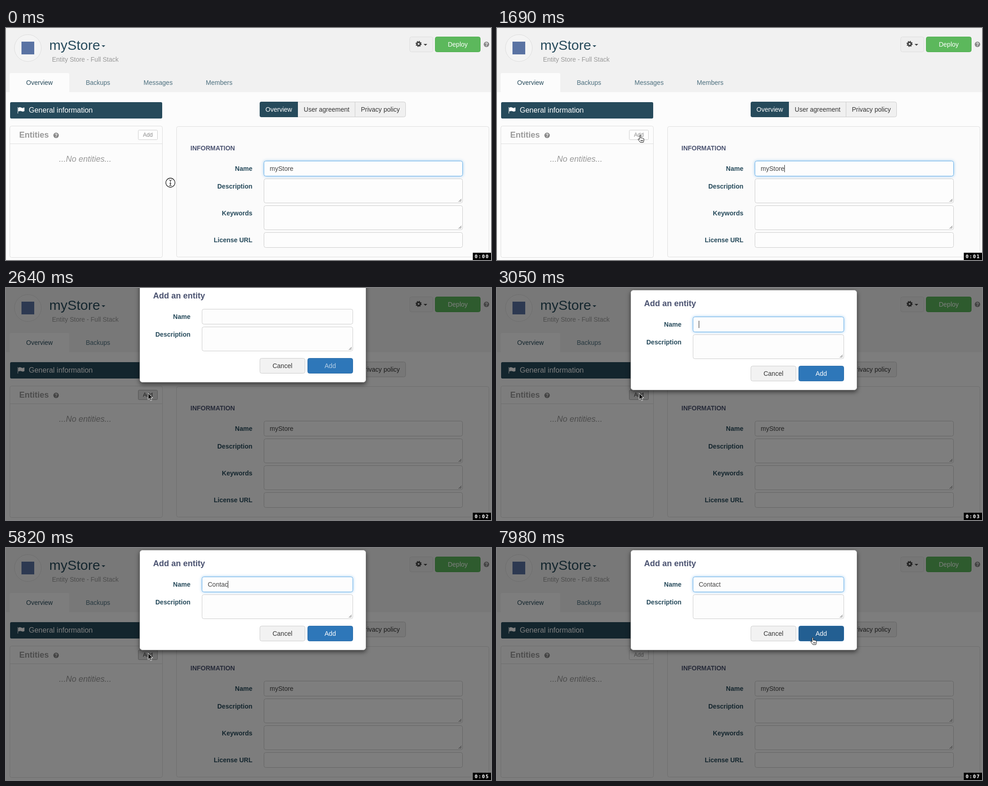
An HTML page that plays this animation: 1065 px wide and 510 px high, repeating every 8 s.

```html
<!DOCTYPE html>
<html lang="en">
<head>
<meta charset="utf-8">
<title>Add an entity</title>
<style>
html, body { margin: 0; width: 100%; height: 100%; overflow: hidden; background: #fcfcfc; }
svg { display: block; }
text { font: 14px "Liberation Sans", Arial, sans-serif; white-space: pre; }
.focus { stroke: #66afe9; filter: drop-shadow(0 0 3px rgba(102, 175, 233, .7)); }
.modal { filter: drop-shadow(0 4px 5px rgba(0, 0, 0, .5)); }
.bubble { filter: drop-shadow(0 2px 3px rgba(0, 0, 0, .3)); }
#clock { font: bold 11px "DejaVu Sans Mono", monospace; letter-spacing: 1.4px; }
</style>
</head>
<body>
<svg id="stage" width="1065" height="510" viewBox="0 0 1065 510"></svg>
<script>
const TEAL = '#264a5b', LINK = '#4c6f7e', GREY = '#999';

const text = (x, y, s, fill = '#333', attrs = '', style = '') =>
  `<text x="${x}" y="${y}" fill="${fill}" ${attrs} style="${style}">${s}</text>`;
const centered = (x, y, s, fill, style) => text(x, y, s, fill, 'text-anchor="middle"', style);
const label = (x, y, s) => text(x, y, s, TEAL, 'text-anchor="end"', 'font-weight:bold');
const box = (x, y, w, h, fill, stroke = 'none', r = 4, attrs = '') =>
  `<rect x="${x + .5}" y="${y + .5}" width="${w - 1}" height="${h - 1}" rx="${r}" fill="${fill}" stroke="${stroke}" ${attrs}/>`;
const input = (x, y, w, h = 34, attrs = '') => box(x, y, w, h, '#fdfdfd', '#ccc', 4, attrs);
const area = (x, y, w) => input(x, y, w, 54) +
  `<path d="M${x + w - 9} ${y + 51}l6-6m-3 6l3-3" stroke="#555" fill="none"/>`;
const help = (x, y) => `<circle cx="${x}" cy="${y}" r="6" fill="#888"/>` +
  centered(x, y + 3.5, '?', '#fff', 'font-size:10px;font-weight:bold');
const down = (x, y, fill) => `<path d="M${x} ${y}h8l-4 4z" fill="${fill}"/>`;
const bar = (id, x, y) => `<rect id="${id}" x="${x}" y="${y}" width="1" height="16" fill="#222"/>`;

const header = box(0, 0, 1065, 141, '#f1f1f1', '#f1f1f1', 0) +
  '<circle cx="48" cy="44" r="29.5" fill="#f4f4f4" stroke="#ddd"/>' +
  '<rect x="34" y="30" width="28" height="28" fill="#5a73a3"/>' +
  text(95, 48, 'myStore', TEAL, '', 'font-size:30px') + down(210, 38, TEAL) +
  text(101, 74, 'Entity Store - Full Stack', GREY) +
  box(886, 19, 52, 34, '#eee', '#ddd') +
  '<circle cx="906" cy="35" r="3.7" fill="none" stroke="#444" stroke-width="3.2"/>' +
  '<circle cx="906" cy="35" r="5.6" fill="none" stroke="#444" stroke-width="2.2" stroke-dasharray="2.2 2.2"/>' +
  down(917, 35, '#444') +
  box(942, 19, 100, 34, '#5cb85c', '#4cae4c') + centered(992, 41, 'Deploy', '#fff') + help(1055, 36) +
  box(8, 99, 131, 43, '#fcfcfc', '#fcfcfc', 2) +
  centered(73.5, 125, 'Overview', TEAL) + centered(202, 125, 'Backups', LINK) +
  centered(334, 125, 'Messages', LINK) + centered(468, 125, 'Members', LINK);

const sidebar = box(9, 163, 334, 36, TEAL, TEAL, 2) +
  '<path d="M26 174v14M27.500 175.500q3-2 6 0t6.500-.5v7.500q-3 1.500-6 0t-6.500.5z" fill="#fff" stroke="#fff"/>' +
  text(50, 186, 'General information', '#fff', '', 'font-size:16px') +
  box(8, 215, 336, 290, '#fcfcfc', '#ddd') + '<path d="M9 254.500h334" stroke="#ddd"/>' +
  text(29, 241, 'Entities', GREY, '', 'font-size:18px;font-weight:bold') + help(110, 236) +
  box(290, 224, 43, 22, '#fff', '#ccc', 2, 'id="addBox"') +
  centered(311.5, 239, 'Add', '#888', 'font-size:12px').replace('<text', '<text id="addText"') +
  centered(174, 294, '...No entities...', GREY, 'font-size:18px;font-style:italic');

const form = box(557, 162, 321, 34, '#f0f0f0', '#ccc') +
  `<path d="M641 162h-80q-4 0-4 4v26q0 4 4 4h80z" fill="${TEAL}"/><path d="M766.500 163v32" stroke="#ccc"/>` +
  centered(599, 184, 'Overview', '#fff') + centered(704, 184, 'User agreement') +
  centered(822, 184, 'Privacy policy') +
  box(374, 216, 687, 288, '#fbfbfb', '#ddd') +
  text(405, 269, 'INFORMATION', '#4a5270', '', 'font-weight:bold') +
  label(541, 314, 'Name') + input(566, 292, 437, 34, 'id="storeName"') + text(579, 314, 'myStore', '#444') +
  bar('storeCaret', 631, 301) +
  label(541, 353, 'Description') + area(566, 331, 437) +
  label(541, 412, 'Keywords') + area(566, 390, 437) +
  label(541, 471, 'License URL') + input(566, 449, 437);

const tooltip = '<g id="tooltip"><path class="bubble" fill="#fff" stroke="#ccc" ' +
  'd="M270 173.500h82q6 0 6 6v27q0 6-6 6h-31l-9.500 9.500-9.500-9.500h-32q-6 0-6-6v-27q0-6 6-6z"/>' +
  centered(311, 198, 'Add entity', '#a2a2a2') + '</g>';

const dialog = '<g id="dialog"><rect id="backdrop" width="1065" height="510" fill="#000" opacity=".5"/><g id="modal">' +
  box(293, 4, 498, 221, '#fff', '#777', 6, 'class="modal"') +
  text(323, 40, 'Add an entity', '#4a5270', '', 'font-size:18px;font-weight:bold') +
  label(405, 85, 'Name') + input(430, 63, 332, 34, 'id="entityName"') +
  text(443, 85, '', '#444', 'id="typed"') + bar('entityCaret', 443, 72) +
  label(405, 124, 'Description') + area(430, 102, 332) +
  box(557, 171, 100, 34, '#f2f2f2', '#ccc') + centered(607, 193, 'Cancel') +
  box(662, 171, 100, 34, '#2e77b9', '#2a6ba6', 4, 'id="confirm"') +
  centered(712, 193, 'Add', '#fff').replace('<text', '<text id="confirmText"') + '</g></g>';

// The pointer shapes have their hot spot at 0,0.
const pointer = '<g id="pointer">' +
  '<circle id="click" r="10" fill="#fff" stroke="#222" stroke-width="1.3"/>' +
  '<path id="beam" d="M-3-6q3 0 3 2q0-2 3-2M0-5v11M-3 7q3 0 3-2q0 2 3 2M-2 2h4" fill="none" stroke="#111"/>' +
  '<path id="arrow" d="M0 0v14.500l3.300-3.100 2.300 5.200 2.400-1-2.200-5.100h4.400z" fill="#111" stroke="#fff"/>' +
  '<path id="hand" transform="translate(-5 0)" fill="#fff" stroke="#111" stroke-linejoin="round" ' +
  'd="M4 10V2Q4 .6 5.200 .6T6.500 2V7Q7.700 5.600 9 7Q10.500 6.300 11.400 7.700Q13.500 7.200 13.600 9.500V12.500Q13 14.500 12.200 16.500H5.800Q4.500 14.500 1 10.500Q.5 8.800 2 8.800Q3 8.800 4 10.200ZM7 11v3m2-3v3m2-3v3"/></g>';

const clock = '<path d="M1025 494h40v16h-40z"/>' + text(1029, 506, '', '#fff', 'id="clock"');

document.getElementById('stage').innerHTML =
  header + sidebar + form + tooltip + dialog + pointer + clock;

const el = id => document.getElementById(id);
const show = (id, on) => el(id).setAttribute('visibility', on ? 'inherit' : 'hidden');
const during = (t, ...spans) => spans.some(([from, to]) => t >= from && t < to);
const passed = (t, times) => times.filter(time => t >= time).length;
const ease = p => p * p * (3 - 2 * p);

const TYPED_AT = [4750, 4930, 5020, 5460, 5550, 5820, 6000];
const TICKS = [1040, 1990, 3050, 4030, 5110, 6100, 7210];

function travel(t, start, end, from, to) {
  const step = (end - start) / 8;
  const p = Math.min(1, Math.max(0, (Math.floor((t - start) / step + .001) + 1) / 9));
  return from.map((v, i) => Math.round(v + (to[i] - v) * ease(p)));
}

function pointerAt(t) {
  if (t < 1810) return travel(t, 950, 1690, [361, 340], [314, 235]);
  if (t < 2460) return [314, 235];
  if (t < 7120) return [312, 231];
  if (t < 7210) return [373, 259];
  return travel(t, 7210, 7890, [373, 259], [693, 196]);
}

function render(t) {
  const storeFocused = t < 2250, pressed = during(t, [2250, 7300]);
  el('storeName').setAttribute('class', storeFocused ? 'focus' : '');
  show('storeCaret', during(t, [320, 770], [1220, 1810]));
  el('addBox').setAttribute('fill', pressed ? '#e2e2e2' : '#fff');
  el('addBox').setAttribute('stroke', pressed ? '#aaa' : '#ccc');
  el('addText').setAttribute('fill', pressed ? '#333' : '#888');

  show('tooltip', during(t, [1810, 2640]));
  el('tooltip').setAttribute('opacity', passed(t, [1810, 1900, 1990]) / 3);

  show('dialog', t >= 2640);
  el('modal').setAttribute('transform', `translate(0 ${t < 2780 ? -17 : 0})`);
  el('confirmText').setAttribute('opacity', t < 2780 ? .65 : 1);
  el('entityName').setAttribute('class', t >= 2960 ? 'focus' : '');
  el('confirm').setAttribute('fill', t >= 7980 ? '#235f92' : '#2e77b9');
  const typed = el('typed');
  typed.textContent = 'Contact'.slice(0, passed(t, TYPED_AT));
  el('entityCaret').setAttribute('x', 443 + Math.round(typed.getComputedTextLength()));
  show('entityCaret', during(t, [2960, 3410], [3950, 4390], [4750, 6580], [7120, 7580]));

  const beam = t < 1130, hand = during(t, [1590, 2460]) || t >= 7980;
  el('pointer').setAttribute('transform', `translate(${pointerAt(t)})`);
  show('click', during(t, [0, 80], [2250, 2350]));
  show('beam', beam);
  show('hand', hand);
  show('arrow', !beam && !hand);
  el('clock').textContent = '0:0' + passed(t, TICKS);
}

function frame(now) {
  render(now % 8000);
  requestAnimationFrame(frame);
}
render(0);
requestAnimationFrame(frame);
</script>
</body>
</html>
```
